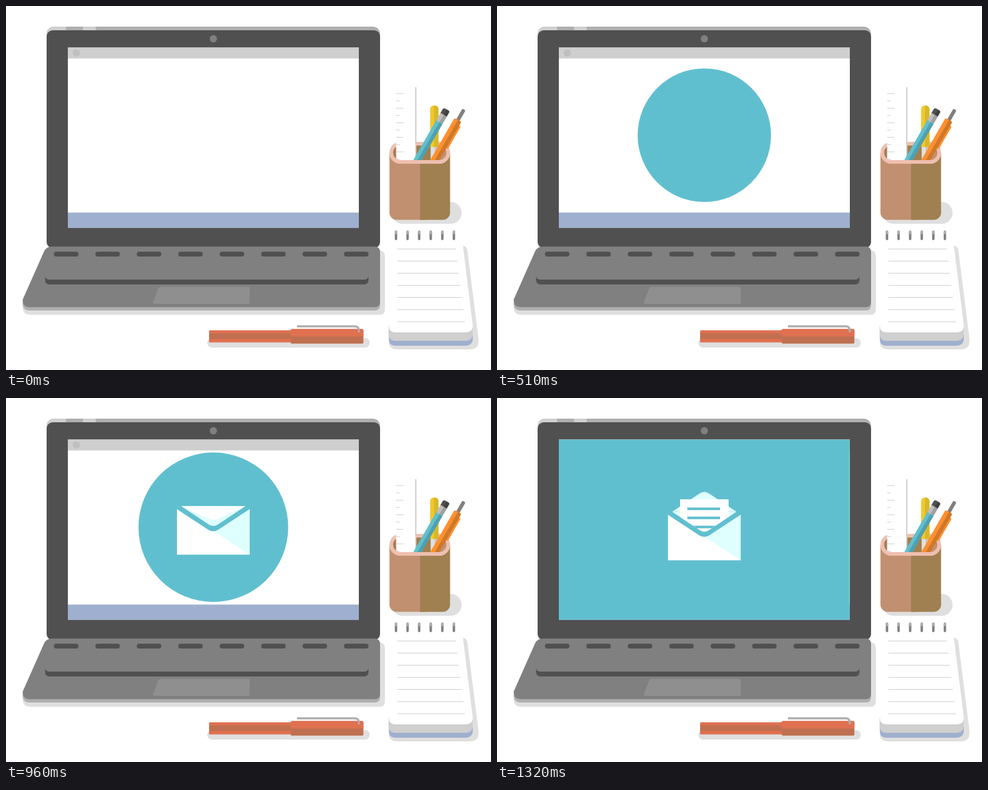
Recreate the animation shown at these times as an HTML page with a canvas. Size 800 px wide and 600 px high, loop 1.5 s.

```html
<!DOCTYPE html>
<html lang="en">
<head>
<meta charset="utf-8">
<title>Mail on a laptop</title>
<style>
html, body { margin: 0; width: 100%; height: 100%; overflow: hidden; background: #fff; }
canvas { display: block; }
</style>
</head>
<body>
<canvas id="stage" width="800" height="600"></canvas>
<script>
const ctx = document.getElementById('stage').getContext('2d');
const LOOP = 1500, STEP = 30;
const TEAL = '#60bfcf', ICE = '#dfffff', DARK = '#505050', GREY = '#808080',
  MID = '#afafaf', PALE = '#cfcfcf', SHADE = '#dfdfdf', BLUE = '#9fafcf',
  TAN = '#c09070', BROWN = '#a08050', PINK = '#efbfaf', RED = '#e07050', RUST = '#c07050';

function rect(color, x, y, w, h, r = 0) {
  ctx.fillStyle = color;
  ctx.beginPath();
  ctx.roundRect(x, y, w, h, r);
  ctx.fill();
}

function shape(color, d) {
  ctx.fillStyle = color;
  ctx.fill(new Path2D(d));
}

function line(color, width, d) {
  ctx.strokeStyle = color;
  ctx.lineWidth = width;
  ctx.stroke(new Path2D(d));
}

function oval(color, x, y, rx, ry = rx) {
  ctx.fillStyle = color;
  ctx.beginPath();
  ctx.ellipse(x, y, rx, ry, 0, 0, Math.PI * 2);
  ctx.fill();
}

// Draws inside a saved state, optionally clipped to a path.
function group(clip, draw) {
  ctx.save();
  if (clip) ctx.clip(new Path2D(clip));
  draw();
  ctx.restore();
}

// Cubic bezier easing (a,0,c,1) between two times.
function ease(t, start, length, a, c) {
  const x = Math.min(1, Math.max(0, (t - start) / length));
  if (x === 0 || x === 1) return x;
  let lo = 0, hi = 1, s = 0.5;
  for (let i = 0; i < 30; i++) {
    s = (lo + hi) / 2;
    const u = 1 - s;
    if (3 * u * u * s * a + 3 * u * s * s * c + s * s * s < x) lo = s;
    else hi = s;
  }
  return s * s * (3 - 2 * s);
}

function laptop() {
  shape(SHADE, 'M600 403H617Q625 404 625 412V500Q625 509 616 509H40Q28 509 27.5 497V488H600Z');
  group('M67 30H617V60H67Z', () => {
    rect(MID, 67, 34, 550, 40, 12);
    group('M67 30H99V60H67ZM127 30H148V60H127Z', () => rect(PALE, 67, 34, 550, 40, 12));
  });
  rect(DARK, 67, 40, 550, 359, 10);
  oval(GREY, 342, 54, 6);
  const base = 'M75 396.5H608Q617 396.5 617 405.5V487.5Q617 496.5 608 496.5H39Q27.5 496.5 27.5 484L63 404Q67 396.5 75 396.5Z';
  group(null, () => {
    ctx.translate(0, 5.5);
    group('M0 470H700V520H0Z', () => shape(MID, base));
  });
  shape(GREY, base);
  for (let i = 0; i < 8; i++) rect(DARK, 79 + i * 68.36, 405, 40.5, 8, 4);
  shape(DARK, 'M64.5 444Q64.5 451 71.5 451H591Q598 451 598 444V451Q598 459 590 459H72.5Q64.5 459 64.5 451Z');
  shape('#8f8f8f', 'M256 463H399Q402 463 402 466V488Q402 491 399 491H245Q241 491 242.5 487L251 466Q252 463 256 463Z');
}

function pen() {
  rect(SHADE, 332, 547.5, 268, 15.5, 7.5);
  rect(RED, 335, 534.5, 137, 20, 1.5);
  rect(RUST, 335, 539.5, 135, 9.5);
  rect(RUST, 469.5, 532.5, 120, 24, 2);
  rect(RED, 469.5, 532.5, 120, 12, [2, 2, 0, 0]);
  line(MID, 3.5, 'M480 528H575Q582 528 582 535V538');
}

// A tilted stick: origin at its top end, y running down its length.
function tilted(x, y, draw) {
  group(null, () => {
    ctx.translate(x, y);
    ctx.rotate(Math.PI / 6);
    draw();
  });
}

function cup() {
  rect(SHADE, 636, 323, 115.5, 36, 18);
  rect(TAN, 632.5, 242, 60, 110.5, [0, 0, 0, 12]);
  rect(BROWN, 683, 242, 49.5, 110.5, [0, 0, 12, 0]);
  rect(BROWN, 635.5, 227, 94, 30, 15);
  group('M701 227H732V257H701Z', () => rect(TAN, 635.5, 227, 94, 30, 15));
  ctx.strokeStyle = PINK;
  ctx.lineWidth = 6;
  ctx.beginPath();
  ctx.roundRect(635.5, 227, 94, 30, 15);
  ctx.stroke();

  group('M600 100H800V255H600Z', () => {
    rect('#fff', 643.5, 134, 33, 122);
    rect(PALE, 675, 134, 2, 121);
    for (let i = 0; i < 10; i++) rect(PALE, 643.5, 144 + i * 12, i % 2 ? 6 : 12, 1);

    rect('#e0e0e0', 700.5, 230, 6.5, 26);
    rect('#c8c8cc', 707, 230, 5.5, 26);
    rect('#f0c830', 699.5, 164, 7, 68.5, [6, 0, 0, 0]);
    rect('#d8b828', 706, 164, 7.5, 68.5, [0, 6, 0, 0]);

    tilted(727, 170.5, () => {
      rect(DARK, -6, 0, 6.5, 11, [3, 0, 0, 0]);
      rect('#404040', 0, 0, 6, 11, [0, 3, 0, 0]);
      rect('#bfbfbf', -6, 10, 6.5, 14);
      rect('#a0a0a0', 0, 10, 6, 14);
      rect(TEAL, -6, 24, 6.5, 86);
      rect('#50a0b0', 0, 24, 6, 86);
    });
    tilted(755.5, 170.5, () => {
      rect(GREY, -3, 0, 6, 22, 2);
      rect('#ff9030', 5, 27, 4.5, 43, 2);
      rect('#ff9030', -6.5, 20, 7, 90, [2, 0, 0, 0]);
      rect('#d07828', 0, 20, 6.5, 90, [0, 2, 0, 0]);
    });
  });
  line(PINK, 6, 'M635.5 242A15 15 0 0 0 650.5 257H714.5A15 15 0 0 0 729.5 242');
}

function notepad() {
  shape(SHADE, 'M754 395Q760 396 761 403L779.5 550Q780 566 766 566H645Q632 566 631.5 554L740 500Z');
  const foot = (color, y) =>
    shape(color, `M631.5 526H770V${y - 11}Q769 ${y} 757 ${y}H643Q631.5 ${y} 631.5 ${y - 11}Z`);
  foot(BLUE, 560);
  foot(PALE, 552);
  shape('#fff', 'M631.5 390H753L770 527Q770 538 757 538H643Q631.5 538 631.5 527Z');
  for (let i = 0; i < 7; i++) rect(PALE, 645.5, 400 + i * 20, 96.5 + i * 2.5, 1);
  for (let i = 0; i < 6; i++) {
    const x = 641.3 + i * 19.1;
    rect(GREY, x, 370, 4, 16, 2);
    rect(MID, x, 370, 4, 6, [2, 2, 0, 0]);
  }
}

// y measured from the fold line of the flap.
function envelope(t) {
  const drop = 13 * ease(t, 780, 510, 0.7, 0);
  const fold = 1 - 2 * ease(t, 780, 540, 0.75, 0.02);
  const rise = ease(t, 1080, 240, 0.5, 0.2);
  const flap = 'M289 0H395L350 30Q342 35.5 334 30Z';
  const drawFlap = color => group(null, () => {
    ctx.scale(1, fold);
    shape(color, flap);
  });

  ctx.translate(0, 174.5 + drop);
  if (fold < 1) shape(ICE, flap);
  drawFlap(fold > 0 ? '#fff' : ICE);

  if (rise > 0) group('M289 0V-60H395V0L350 30Q342 35.5 334 30Z', () => {
    ctx.translate(0, 56 * (1 - rise) - 20.5);
    rect('#fff', 302, 0, 80, 70);
    for (let i = 0; i < 3; i++) rect(TEAL, 314, 13.5 + i * 15, 54, 4.3);
  });

  shape('#fff', 'M282 5L333 38.5Q342 44.5 351 38.5L402 5V80H282Z');
  shape(ICE, 'M343 41.5Q347 41 351 38.5L402 5V80Z');
}

function screen(t) {
  rect('#fff', 102, 68.5, 480, 297);
  rect(PALE, 102, 68.5, 480, 18);
  oval('#bfbfbf', 116, 77.5, 6);
  rect(BLUE, 102, 340.5, 480, 25);
  group('M102 68.5H581.6V365.5H102Z', () => {
    const radius = (pop, spread) =>
      110 * ease(t, 0, 510, pop, 0) + 190 * ease(t, 780, 540, spread, 0.27);
    if (t > 0) oval(TEAL, 342, 213, radius(0.747, 0.908), radius(0.738, 0.915));
    if (t >= 570) {
      ctx.globalAlpha = t < 630 ? 0.5 : 1;
      envelope(t);
    }
  });
}

function frame(now) {
  const t = Math.floor((now % LOOP) / STEP) * STEP;
  ctx.fillStyle = '#fff';
  ctx.fillRect(0, 0, 800, 600);
  laptop();
  screen(t);
  pen();
  cup();
  notepad();
}

const begin = performance.now();
function tick() {
  frame(performance.now() - begin);
  requestAnimationFrame(tick);
}
tick();
</script>
</body>
</html>
```
